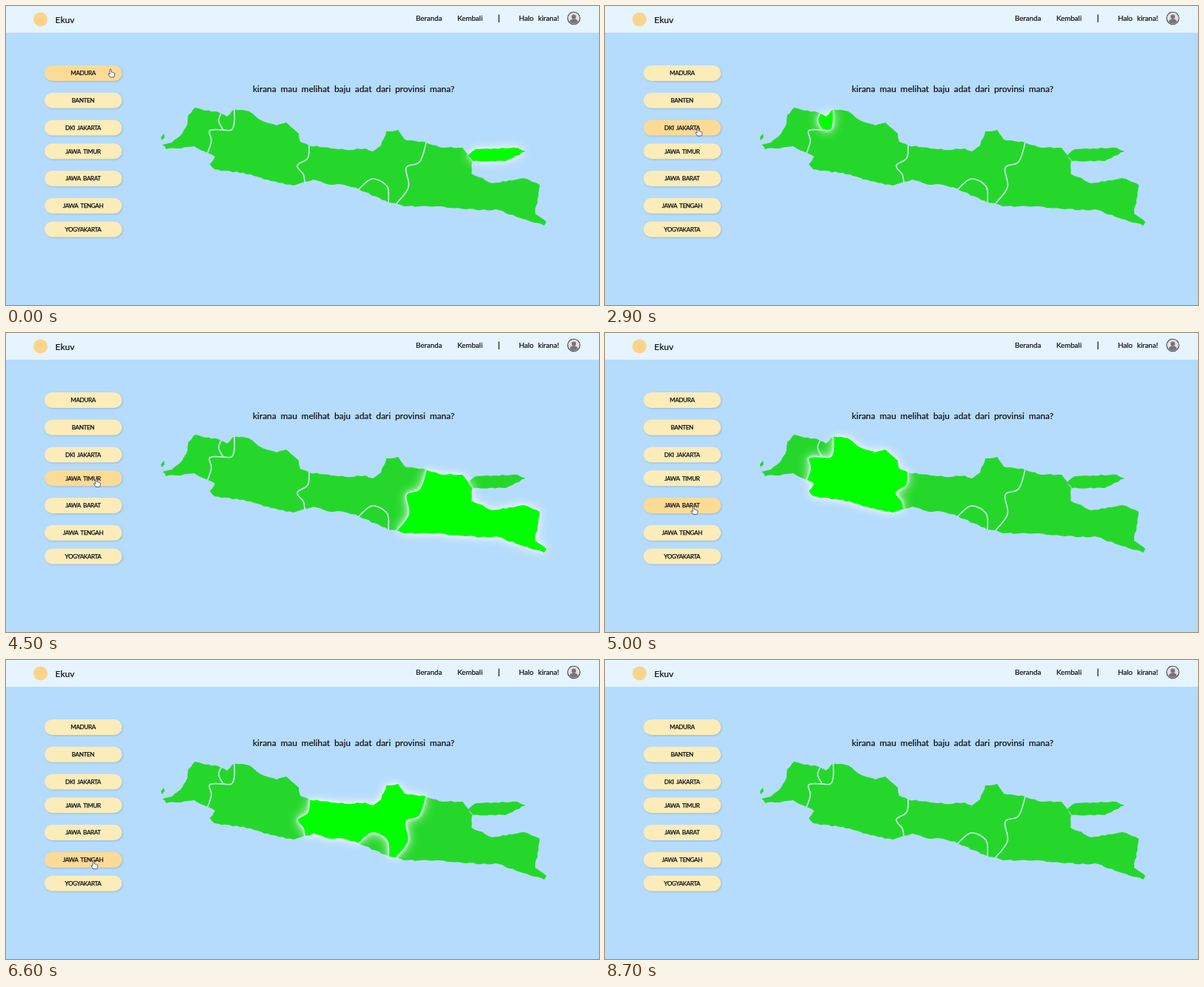
Write an HTML page that moves like this. It is 800 by 403 pixels and loops after 8800 ms.

```html
<!DOCTYPE html>
<html lang="id">
<head>
<meta charset="utf-8">
<title>Peta baju adat</title>
<style>
  html, body { margin: 0; width: 100%; height: 100%; overflow: hidden; background: #b5dcfc; }
  svg { display: block; width: 100vw; height: 100vh; }
  text { font-family: Lato, "Open Sans", sans-serif; fill: #0b0d10; stroke: #0b0d10; stroke-width: .2; }
  .nav { font-size: 9.7px; word-spacing: 3.5px; }
  .label { font-size: 8.1px; letter-spacing: -.35px; word-spacing: 1.8px; text-anchor: middle; stroke-width: .25; }
  .title { font-size: 11.9px; word-spacing: 2.8px; text-anchor: middle; }
  .pill { filter: drop-shadow(1px 1.5px 1.2px rgba(70, 100, 130, .28)); }
  .glow { fill: #0f0; filter: drop-shadow(0 0 2px rgba(255, 255, 255, .8)) drop-shadow(0 0 7px rgba(255, 255, 255, .85)); }
</style>
</head>
<body>
<svg id="stage" viewBox="0 0 800 403">
  <rect width="800" height="403" fill="#b5dcfc"/>
  <rect width="800" height="36" fill="#e5f4fe"/>
  <circle cx="46.5" cy="18" r="9.5" fill="#fbd38a"/>
  <text x="66.5" y="22.5" font-size="12">Ekuv</text>
  <g class="nav">
    <text x="553" y="20.3">Beranda</text>
    <text x="609" y="20.3">Kembali</text>
    <text x="692" y="20.3">Halo kirana!</text>
  </g>
  <path d="M665 11.5V22" stroke="#111" stroke-width="1.2"/>
  <circle cx="766" cy="16.5" r="8.3" fill="#e4e1e2" stroke="#45454a" stroke-width="1.1"/>
  <circle cx="766" cy="14.5" r="3" fill="#77747a"/>
  <path d="M760.5 21.5a5.5 4.2 0 0 1 11 0a8 8 0 0 1 -11 0Z" fill="#77747a"/>
  <text class="title" x="469" y="116">kirana mau melihat baju adat dari provinsi mana?</text>
  <g id="map"></g>
  <g id="menu"></g>
  <path id="hand" d="M-1 1Q-1 0 0 0T1 1V4.2Q2 3.5 2.7 4.5Q3.8 4 4.3 5.1Q5.6 4.8 5.7 6V8Q5.6 9.5 4.8 10.8H-.4L-3 7.2Q-3.4 6 -2.3 6L-1 7Z" fill="#fff" stroke="#333" stroke-width=".75" stroke-linejoin="round"/>
</svg>
<script>
const LOOP = 8800, STEP = 100, DWELL = 1160, GLIDE = 230, PILL_H = 21;
const $ = id => document.getElementById(id);
const mix = (a, b, k) => a + (b - a) * k;

function add(parent, tag, attrs, text) {
  const el = document.createElementNS("http://www.w3.org/2000/svg", tag);
  for (const k in attrs) el.setAttribute(k, attrs[k]);
  if (text) el.textContent = text;
  parent.appendChild(el);
  return el;
}

let seed = 11;
const random = () => (seed = seed * 16807 % 2147483647) / 2147483647;
const parse = s => s.split(" ").map(p => p.split(",").map(Number));

// Ragged shoreline through a few key points.
function coast(s) {
  const keys = parse(s), out = [keys[0]];
  for (let i = 1; i < keys.length; i++) {
    const [a, b] = [keys[i - 1], keys[i]];
    const n = Math.max(1, Math.round(Math.hypot(b[0] - a[0], b[1] - a[1]) / 5));
    for (let j = 1; j < n; j++)
      out.push([0, 1].map(c => mix(a[c], b[c], j / n) + (random() - .5) * 1.8));
    out.push(b);
  }
  return out;
}

// Smooth Catmull-Rom curve through the key points.
function border(s) {
  const p = parse(s), out = [p[0]], N = 8;
  for (let i = 1; i < p.length; i++) {
    const [a, b, c, d] = [p[i - 2] || p[i - 1], p[i - 1], p[i], p[i + 1] || p[i]];
    for (let j = 1; j <= N; j++) {
      const u = j / N;
      out.push([0, 1].map(k => b[k] + u / 2 * (c[k] - a[k]
        + u * (2 * a[k] - 5 * b[k] + 4 * c[k] - d[k])
        + u * u * (3 * b[k] - a[k] - 3 * c[k] + d[k]))));
    }
  }
  return out;
}

const back = points => [...points].reverse();
const path = points => "M" + points.map(p => p.join(" ")).join("L");
const ring = (...parts) => path(parts.flat()) + "Z";

const bantenJakarta = border("290,145 287,155 293,167");
const jakartaBarat = border("293,167 304,167 308,157 308,139");
const bantenBarat = border("293,167 275,168 277,182 272,198");
const baratTengah = border("409,188 407,205 393,215 401,227 403,237");
const tengahTimur = border("567,184 558,210 540,218 543,244 527,266");
const tengahYogya = border("476,247 494,233 514,243 516,265");

const madura = coast("623,202 634,193 690,191 701,196 674,209 630,209 623,202");
const islet = coast("209,177 213,172 214,177 210,181");
const bantenCoast = coast("272,198 254,189 216,193 211,187 224,184 235,175 243,163 246,147 255,137 269,141 282,142 290,145");
const jakartaCoast = coast("290,145 298,149 308,139");
const baratNorth = coast("308,139 328,142 344,154 365,161 378,157 395,172 397,183 409,188");
const baratSouth = coast("403,237 388,242 358,236 330,227 281,220 275,213 282,203 272,198");
const tengahNorth = coast("409,188 458,194 485,192 495,196 506,188 513,169 529,167 538,180 567,184");
const tengahSouth = coast("476,247 456,241 433,240 415,234 403,237");
const yogyaSouth = coast("516,265 476,247");
const timurCoast = coast("567,184 584,190 616,191 629,209 628,226 656,239 698,232 720,241 714,280 729,291 726,296 688,284 665,275 620,274 580,270 537,270 527,266");

const areas = [
  ["MADURA", ring(madura)],
  ["BANTEN", ring(bantenCoast, bantenJakarta, bantenBarat) + ring(islet)],
  ["DKI JAKARTA", ring(jakartaCoast, back(jakartaBarat), back(bantenJakarta))],
  ["JAWA TIMUR", ring(timurCoast, back(tengahTimur))],
  ["JAWA BARAT", ring(baratNorth, baratTengah, baratSouth, back(bantenBarat), jakartaBarat)],
  ["JAWA TENGAH", ring(tengahNorth, tengahTimur, back(yogyaSouth.concat(back(tengahYogya)).slice(0, 0)), back(tengahYogya), tengahSouth, back(baratTengah))],
  ["YOGYAKARTA", ring(tengahYogya, yogyaSouth)]
].map(([name, d], i) => {
  // Buttons come in groups of three, with a tighter gap between groups.
  const y = 80 + 36.8 * i - 5.2 * Math.floor(i / 3);
  add($("map"), "path", { d, fill: "#26d72b" });
  const pill = add($("menu"), "rect", { class: "pill", x: 52, y, width: 104.5, height: PILL_H, rx: PILL_H / 2 });
  add($("menu"), "text", { class: "label", x: 104, y: y + 13.4 }, name);
  return { d, y, pill };
});

const glow = add($("map"), "path", { class: "glow" });
for (const b of [bantenJakarta, jakartaBarat, bantenBarat, baratTengah, tengahTimur, tengahYogya])
  add($("map"), "path", { d: path(b), fill: "none", stroke: "#c6f1e8", "stroke-width": 1.7 });

// Resting place of the pointer on button i.
const rest = i => [116 + 25 * Math.exp(-i / 2), areas[i].y + 12 - 7 * Math.exp(-i / 1.2)];

function pointer(t) {
  const i = Math.floor(t / DWELL);
  if (i >= areas.length) return null;
  const k = Math.min(1, (t - i * DWELL) / GLIDE), e = k * k * (3 - 2 * k);
  const from = rest(Math.max(0, i - 1)), to = rest(i);
  return [mix(from[0], to[0], e), mix(from[1], to[1], e)];
}

function draw(now) {
  const t = Math.floor(now % LOOP / STEP) * STEP;
  const tip = pointer(t);
  const hot = tip && areas.find(a => tip[1] >= a.y && tip[1] <= a.y + PILL_H);
  for (const a of areas) a.pill.setAttribute("fill", a === hot ? "#fcdb97" : "#fbecb9");
  glow.setAttribute("d", hot ? hot.d : "");
  $("hand").style.display = tip ? "" : "none";
  if (tip) $("hand").setAttribute("transform", `translate(${tip[0]} ${tip[1]})`);
}

const start = performance.now();
function tick() {
  draw(performance.now() - start);
  requestAnimationFrame(tick);
}
tick();
</script>
</body>
</html>
```
